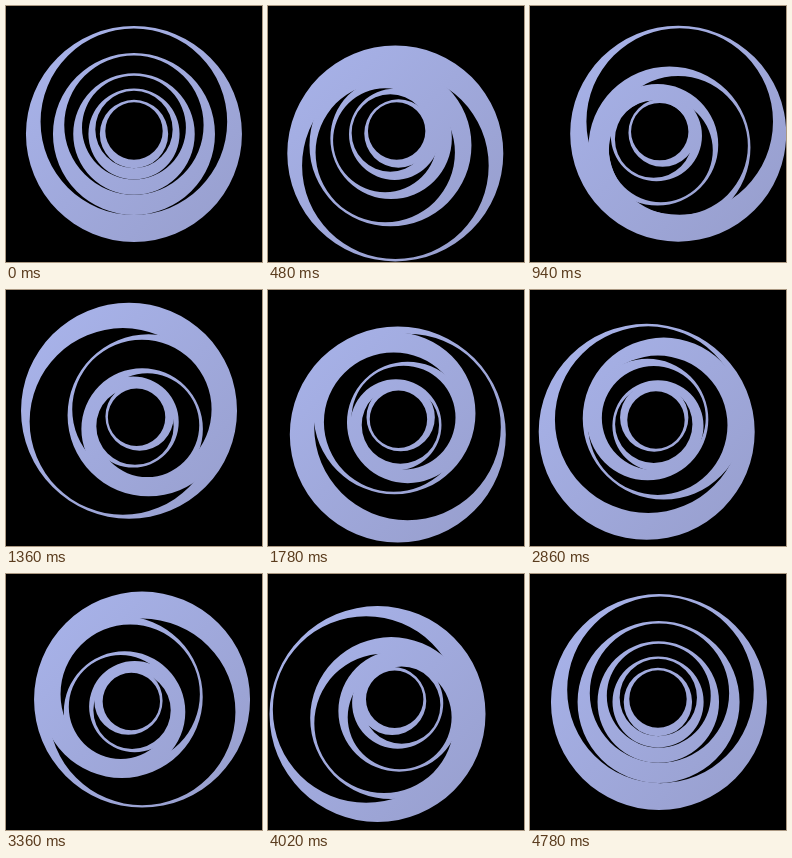
An HTML page with a canvas that plays this animation: 256x256 px, repeating every 4800 ms.

```html
<!DOCTYPE html>
<html>
<head>
<meta charset="utf-8">
<style>
  html, body { margin: 0; height: 100%; overflow: hidden; background: #000; }
  canvas { display: block; width: 256px; height: 256px; }
</style>
</head>
<body>
<canvas id="stage" width="256" height="256"></canvas>
<script>
const ctx = document.getElementById('stage').getContext('2d');
const LOOP = 4800, TURN = 2 * Math.PI, CENTER = 128;
const RINGS = 5, OUTER = 108, SHRINK = 0.75, THIN = 2.4;

const fill = ctx.createLinearGradient(30, 30, 226, 226);
fill.addColorStop(0, '#a8b3ea');
fill.addColorStop(1, '#989fce');

// Unit vector that points up at rest and turns counter-clockwise.
const up = angle => ({ x: -Math.sin(angle), y: -Math.cos(angle) });

// A disc with an off-centre hole that leaves a THIN rim in the given direction.
function drawRing(x, y, radius, angle) {
  const dir = up(angle);
  const shift = (radius * (1 - SHRINK) - THIN) / 2;
  const hx = x + dir.x * shift, hy = y + dir.y * shift;
  const hr = radius - shift - THIN;
  ctx.beginPath();
  ctx.arc(x, y, radius, 0, TURN);
  ctx.closePath();
  ctx.moveTo(hx + hr, hy);
  ctx.arc(hx, hy, hr, 0, TURN);
  ctx.fill('evenodd');
}

function draw(time) {
  const phase = TURN * (time % LOOP) / LOOP;
  ctx.fillStyle = '#000';
  ctx.fillRect(0, 0, 256, 256);
  ctx.fillStyle = fill;

  let x = CENTER + 5.4 * Math.sin(phase), y = CENTER;
  const swing = (size, to, from) => {
    const a = up(to * phase), b = up(from * phase);
    x += size * (a.x - b.x);
    y += size * (a.y - b.y);
  };

  // From the inside out, each ring turns once more per loop than the last
  // and swings around the ring it encloses.
  for (let n = 1; n <= RINGS; n++) {
    const scale = SHRINK ** (RINGS - n);
    if (n > 1) swing(10.8 * scale, n - 1, n - 2);
    swing(2.4 * scale, n - 1, n - 3);
    drawRing(x, y, OUTER * scale, n * phase);
  }
}

function tick() {
  draw(performance.now());
  requestAnimationFrame(tick);
}
tick();
</script>
</body>
</html>
```
